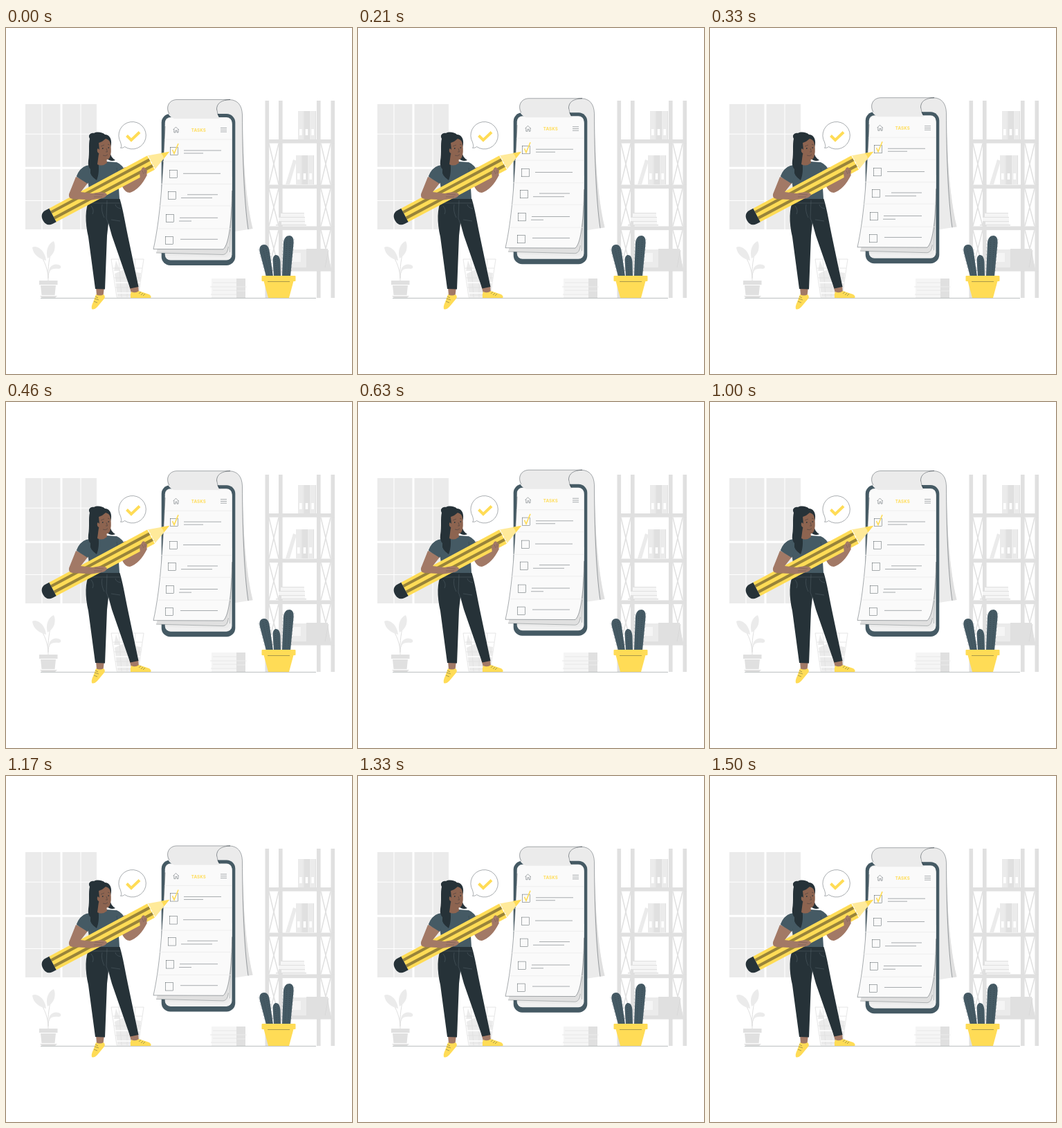
An HTML page for the animation above (1.54 s loop, 500 px wide and 500 px high).

```html
<!DOCTYPE html>
<html lang="en">
<head>
<meta charset="utf-8">
<title>Tasks</title>
<style>
html, body { margin: 0; width: 100%; height: 100%; overflow: hidden; background: #fff; }
svg { display: block; width: 100vw; height: 100vh; }
.ink { fill: none; stroke: #263238; stroke-width: .4; }
.g0 { fill: #f5f5f5; } .g1 { fill: #ebebeb; } .g2 { fill: #e0e0e0; }
.dark { fill: #263238; } .slate { fill: #455a64; }
.sun { fill: #ffdc56; } .skin { fill: #a27966; } .shade { fill: #8d6450; }
.tick { fill: none; stroke: #ffdc56; }
.title { font: 700 6.1px Inter, Roboto, sans-serif; fill: #ffdc56; letter-spacing: .15px; }
</style>
</head>
<body>
<svg viewBox="0 0 500 500">
  <g id="room"></g>

  <g id="plant">
    <path d="M61 365C61 350 57 338 46 322M61 362C60 345 63 332 66 318M61 361C61 351 65 346 72 345" fill="none" stroke="#e0e0e0"/>
    <path class="g1" d="M58 336C48 334 39 327 38 317C45 313 57 322 58 336ZM60 333C57 322 61 311 69 308C73 316 70 328 60 333ZM62 351C63 344 69 340 76 342C81 344 80 348 76 348C70 347 67 348 62 351Z"/>
    <path class="g2" d="M48 365H74.5V371H48ZM50 372H72L70.5 386H51.5ZM49 387H74L71 390H52Z"/>
  </g>

  <g id="basket">
    <path class="g1" d="M157 355L168 350L195 354L191 388H161ZM159 336L165 351H156Z"/>
    <path d="M152 334H199L191 389H160ZM154 347H197M156 361H195M158 375H193M163 334L167 389M175 334V389M187 334L183 389" fill="none" stroke="#e0e0e0" stroke-width=".8"/>
    <path d="M158 368H194M160 383H192" stroke="#fff" stroke-width="1.5"/>
  </g>

  <g id="papers">
    <path class="g0" d="M297 362H333V390H297Z"/>
    <path class="g2" d="M333 362H346V390H333Z"/>
    <path d="M299 368H333M295 374H333M299 379H333M296 385H333" stroke="#e6e6e6" stroke-width=".9"/>
    <path d="M333 374H348M334 380H346" stroke="#ececec" stroke-width=".8"/>
  </g>

  <path class="ink" d="M50 390.4H448" opacity=".8"/>

  <g id="cactus">
    <path class="slate" d="M376 359L367 325C365 317 368 313 373 313C378 313 380 317 381 324L386 359ZM387 359L385.5 335C386 330 388 328 390 328C394 328 396 332 396.5 338L397 359ZM399 359L401 310C402 303 405 300 410 300C415 301 416 305 415.5 312L411 359Z"/>
    <path d="M371 317L380 357M375 315L384 357M389 331L391 357M393 333L394 357M406 303L403 357M411 303L408 357" class="ink" stroke-dasharray="1 2"/>
    <g id="spines" class="ink" opacity=".6"></g>
    <path class="sun" d="M372 364H416L409 390H379Z"/>
    <rect class="sun" x="369.5" y="358" width="49" height="8" rx="1"/>
    <path class="ink" d="M378 366.5H410"/>
  </g>

  <g id="phone">
    <path class="g1" d="M304 117C304 109 312 103.5 323 103.5C335 104 341 112 341.5 125C342 185 346 245 356.5 290L331 294H300Z"/>
    <path class="g2" d="M341.5 125C342 185 346 245 356.5 290L350 291C343 245 340 190 341.5 125Z"/>
    <path class="ink" d="M304.5 119C303 109 312 103.5 323 103.5C335 104 341 112 341.5 125C342 185 344 250 350 291"/>
    <rect class="slate" x="224.7" y="124" width="106.6" height="219" rx="12.5"/>
    <rect x="229.7" y="129" width="96.8" height="206.5" rx="8" fill="#f0f0f0"/>
    <path class="g1" d="M326.5 245L323 326Q322 331 316 331L230 329V245Z"/>
    <path class="g2" d="M326.5 215L323 310Q321 327 314 327.5L217 325L224 300Z"/>
    <path class="ink" d="M326 245L323.5 324M217 325L314 327.5Q320 327 321.5 316" opacity=".7"/>
    <path fill="#fafafa" d="M230 139Q230 130 240 130H319Q326.5 130 326.7 139V235C326 275 323 312 314 319.8L213 319.5C224 270 227 200 230 139Z"/>
    <path class="ink" d="M230 142C227 205 224 270 213 319.5L314 319.8C323 312 326 275 326.7 235"/>
    <path class="g1" d="M233 117C233 108 239 103.5 247 103.5H324C313 104 304.5 109 304.5 117C304.5 122 306 127 309 131H243C237 129 233 124 233 117Z"/>
    <path class="ink" d="M236 124C230 114 236 103.5 247 103.5H324C311 104 304.5 109 304.5 117Q305 124 309 129"/>
    <path class="ink" d="M241.5 147L245.5 143L249.5 147M242.8 146V151H245V148H247V151H249V146M310 144.5H319M310 147.3H319M310 150H319"/>
    <text class="title" x="278.3" y="150.2" text-anchor="middle">TASKS</text>
    <g id="rows"></g>
    <path class="tick" d="M240.5 176L243 181.5L249 167" stroke-width="1.6"/>
  </g>

  <g id="bubble">
    <path class="ink" style="fill:#fff" d="M165.5 173.3C169.5 173.5 171 172 171.5 171.5A19.7 19.7 0 1 0 165.5 165C166.5 169 167.5 171 165.5 173.3Z"/>
    <path class="tick" d="M174.5 155.5L181 162L193 150.5" stroke-width="4"/>
  </g>

  <g id="woman">
    <path class="skin" d="M130 374H142L140.5 387H131ZM178 372H191L192 383H181Z"/>
    <path class="sun" d="M130 385Q136 388 141 385Q144 388 142 391L132 403Q127 408 124 406Q123 402 126 396ZM181 381Q187 384 192 380L207 385Q211 388 209 390H180Q179 385 181 381Z"/>
    <path class="ink" d="M128 391L134 393M127 395L132 397M129 388L133 390M192 384L195 381M195 386L198 383M198 387L201 384"/>
    <path class="dark" d="M121 247H164.5C169 262 172 280 176 300L191.5 374L179.5 376.5L153 300L148 282L146 300L143 377.5L129 377L119 302C114 280 114 261 121 247Z"/>
    <path d="M122 253H165M139 255Q137 264 142 274M146 249L145 275L148 283M152 277L165 279M123 257Q128 263 125 269M158 255Q159 260 166 261" fill="none" stroke="#607078" stroke-width=".4"/>

    <path class="skin" d="M157 205L174 201L180 222L195 207L204 212Q194 233 179 238Q172 238 168 229Z"/>
    <path class="slate" d="M131 196L145 193L160 194Q170 198 172 209L162 216L164 247H121L119 224L102 214Q107 202 116 199Z"/>
    <path d="M118 205L119 225L124 235M160 202L162 216" class="ink" opacity=".7"/>
    <path class="dark" d="M121 160C118 155 122 151 127 152C132 149 140 151 143 154C149 154 153 160 152 168L150 178Q151 187 158 191Q151 194 145 188L133 190C135 204 134 213 131 220Q126 217 122 211L122 204Q118 200 119 192C121 180 119 168 121 160Z"/>
    <path class="shade" d="M134 182L145 186L146 195Q139 201 132 197Z"/>
    <path class="shade" d="M134 166Q140 164 144 160Q150 161 151 168Q153 180 150 187Q147 192 142 190Q136 187 134 181Q131 179 132 175Q133 173 135 176Z"/>
    <path d="M137 171L142 169M147 168L150 169M145 174L146.5 179L144 179M140 184Q144 186 147 183" class="ink"/>
    <path class="dark" d="M139 174a.8 1 0 1 0 1.6 0a.8 1 0 1 0-1.6 0M147.5 173a.7 1 0 1 0 1.4 0a.7 1 0 1 0-1.4 0"/>

    <g transform="translate(236 180.5) rotate(-28.1)">
      <path class="sun" d="M-191-11L-30-11.5V11.5L-191 11Z"/>
      <path fill="#99843a" d="M-191-6.8L-30-7V-2.7H-191ZM-191 2.7H-30V7L-191 6.8Z"/>
      <path fill="#ffea9a" d="M-30-11.5L1-1.5L-30 11.5Q-27 9-30 7Q-27 5-30 2.7Q-27 0-30-2.7Q-27-5-30-7Q-27-9-30-11.5Z"/>
      <path class="sun" d="M-11-5.4L1-1.5L-11 3.5Q-9-1-11-5.4Z"/>
      <path class="dark" d="M-191-11V11H-197C-204 11-207 6-207 0C-207-6-204-11-197-11Z"/>
    </g>

    <path class="skin" d="M101 215L119 223L108 237L125 239L137 237Q146 238 146 241Q144 245 139 246L124 248.5L96 247Q90 246 91 240Z"/>
    <path class="slate" d="M117 199Q106 202 102 215L118 225L123 212Z"/>
    <path class="skin" d="M193 209L197 202Q200 200 201 203L204 206L203 214L194 219Z"/>
    <path d="M128 240L141 241M127 244L139 244M197 206L199 211M201 205L201 210" class="ink" opacity=".6"/>
  </g>
</svg>
<script>
const $ = id => document.getElementById(id);
const rect = (c, x, y, w, h) => `<rect class="${c}" x="${x}" y="${y}" width="${w}" height="${h}"/>`;
const line = (d, color, w) => `<path d="${d}" fill="none" stroke="${color}" stroke-width="${w}"/>`;

function room() {
  let s = rect('g1', 28, 110, 103, 181);
  s += line('M80 110V291M28 202.3H131', '#fff', 3);
  s += line('M52 110V291M108 110V291M28 153.3H131M28 249.5H131', '#fff', 1.1);
  for (const [top, bottom] of [[167, 226], [232, 286], [292, 346]])
    for (const [l, r] of [[380, 394], [455, 469]])
      s += line(`M${l} ${top}L${r} ${bottom}M${r} ${top}L${l} ${bottom}`, '#e0e0e0', 1.5);
  for (const x of [374.5, 394, 449, 469.5]) s += rect('g2', x, 105, 5.6, 285);
  for (const y of [161, 226.5, 286.5, 346]) s += rect('g2', 380, y, 95, 5.6);
  // binders
  for (const [x, y, h] of [[422, 120, 41], [419, 184, 42]])
    for (let i = 0; i < 3; i++) {
      const bx = x + i * 8.7;
      s += rect(i == 1 ? 'g2' : 'g1', bx, y, 8.4, h);
      s += `<rect x="${bx + 2}" y="${y + 26}" width="3.6" height="9" fill="#fff"/>`;
      s += line(`M${bx + 8.2} ${y}v${h}`, '#d8d8d8', .7);
    }
  s += '<path class="g1" d="M415 190L420 192L410 226H404Z"/>';
  // lying books
  [[397, 267, 34], [394, 273, 38], [398, 279, 34]].forEach(b => {
    s += rect('g0', b[0], b[1], b[2], 6) + rect('g2', b[0], b[1], b[2], 1);
  });
  s += rect('g2', 390, 284, 44, 1.5);
  s += rect('g1', 409, 320, 25, 26) + rect('g0', 412, 325, 14, 13);
  s += '<path class="g2" d="M434 319H465L469 346H434Z"/>';
  s += line('M466 321L461 346', '#d6d6d6', .8);
  return s;
}

function rows() {
  const boxes = [[237, 172], [236, 205], [234, 236], [231, 269], [230, 301]];
  const dashes = [[257, 311, 177], [257, 285, 181], [256, 310, 210.3], [262, 306, 240.8],
    [253, 298, 245.5], [251, 306, 274.3], [250, 268, 279], [252, 306, 305.3]];
  let s = '';
  for (const y of [161, 193, 225.5, 257, 290])
    s += line(`M${229 - (y - 161) * .08} ${y}H326`, '#ebebeb', .8);
  for (const [x, y] of boxes)
    s += `<rect class="ink" x="${x + .3}" y="${y + .3}" width="11.3" height="11.3"/>`;
  for (const [a, b, y] of dashes) s += `<path class="ink" d="M${a} ${y}H${b}"/>`;
  return s;
}

function spines() {
  let d = '';
  for (let i = 0; i < 10; i++) {
    const y = 306 + i * 5;
    d += `M${415.5 - i * .45} ${y}l1.5-1M${401 - i * .2} ${y + 2}l-1.5-1`;
    if (i > 2) d += `M${367 + (y - 325) * .26} ${y}l-1.5-.5M${380.5 + (y - 321) * .14} ${y}l1.5-.8`;
  }
  return `<path d="${d}"/>`;
}

$('room').innerHTML = room();
$('rows').innerHTML = rows();
$('spines').innerHTML = spines();

// The phone floats up and down at an even speed.
const LOOP = 1540, RISE = 6.4, LOW = 1510;
function draw(ms) {
  const p = ((ms - LOW) / LOOP % 1 + 1) % 1;
  const up = 1 - Math.abs(1 - 2 * p);
  $('phone').setAttribute('transform', `translate(0 ${(.25 - RISE * up).toFixed(3)})`);
}

const start = performance.now();
function tick() {
  draw((performance.now() - start) % LOOP);
  requestAnimationFrame(tick);
}
tick();
</script>
</body>
</html>
```
